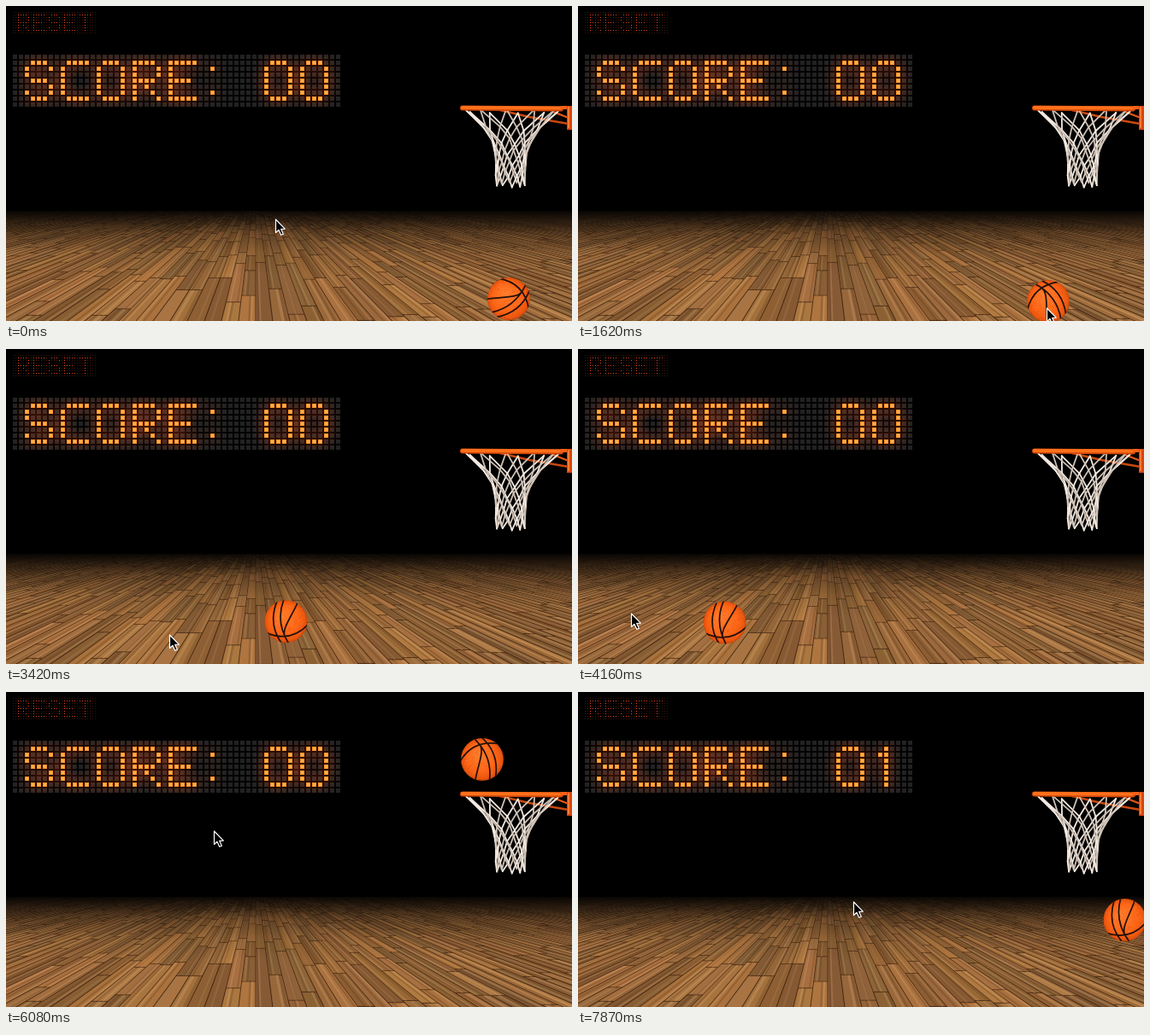
These frames come from a looping animation (662 px wide and 369 px high, 8 s). An HTML page with a canvas:

```html
<!DOCTYPE html>
<html lang="en">
<head>
<meta charset="utf-8">
<title>Basketball</title>
<style>
html, body { margin: 0; width: 100%; height: 100%; overflow: hidden; background: #000; }
canvas { display: block; }
</style>
</head>
<body>
<canvas id="stage" width="662" height="369"></canvas>
<script>
const W = 662, H = 369, LOOP = 8000, TAU = Math.PI * 2;
const R = 25, GRAVITY = 417, FLOOR = 346, CEILING = 25, LEFT = 30;
const ctx = document.getElementById('stage').getContext('2d');

const GLYPHS = {
  S: '.###. #...# #.... .###. ....# #...# .###.',
  C: '.#### #.... #.... #.... #.... #.... .####',
  O: '.###. #...# #...# #...# #...# #...# .###.',
  R: '####. #...# #...# ####. #.#.. #..#. #...#',
  E: '##### #.... #.... ####. #.... #.... #####',
  T: '##### ..#.. ..#.. ..#.. ..#.. ..#.. ..#..',
  ':': '..... .#... ..... ..... ..... .#... .....',
  1: '..#.. .##.. ..#.. ..#.. ..#.. ..#.. ..#..'
};
GLYPHS[0] = GLYPHS.O;

// Seconds and place of the pointer's tip
const pointerPath = [
  [0, 315, 250], [1.62, 548, 354], [1.92, 550, 79], [2.67, 576, 220], [3.27, 217, 340],
  [4.16, 62, 310], [4.9, 105, 331], [5.64, 106, 354], [5.79, 64, 340], [5.88, 243, 163],
  [6.08, 243, 163], [6.83, 280, 311], [7.87, 322, 246], [8, 322, 246]
];
const grabs = [[1.62, 1.92], [5.64, 5.88]];
// Throws and hits on the hoop: the ball flies freely from each
const launches = [
  { at: 0, x: 588, y: 343, vx: 103, vy: 0 },
  { at: .38, x: 627, y: FLOOR, vx: -62, vy: 0 },
  { at: 1.92, x: 552, y: 71, vx: 255, vy: -147 },
  { at: 2.285, x: 627, y: 46, vx: -264, vy: 4 },
  { at: 5.88, x: 245, y: 155, vx: 1560, vy: -422 },
  { at: 6.125, x: 627, y: 64, vx: -100, vy: -320 },
  { at: 6.543, x: 585, y: 95, vx: 41, vy: -147 }
];

function seeded(seed) {
  return () => (seed = (seed * 16807) % 2147483647) / 2147483647;
}

function pointerAt(t) {
  const i = Math.max(1, pointerPath.findIndex(p => p[0] > t));
  const [t0, x0, y0] = pointerPath[i - 1], [t1, x1, y1] = pointerPath[i];
  const u = (t - t0) / (t1 - t0);
  return { x: x0 + (x1 - x0) * u, y: y0 + (y1 - y0) * u };
}

function move(ball, dt) {
  ball.x += ball.vx * dt;
  ball.y += ball.vy * dt + GRAVITY * dt * dt / 2;
  ball.vy += GRAVITY * dt;
  if (ball.y > FLOOR) {
    const rebound = ball.vy > 30 ? ball.vy * .36 : 0;
    if (rebound) ball.vx -= Math.sign(ball.vx) * (ball.vy + rebound) * .085;
    ball.y = FLOOR;
    ball.vy = -rebound;
  }
  if (ball.y < CEILING) {
    ball.y = CEILING;
    ball.vy *= -.6;
  }
  if (ball.x < LEFT) {
    ball.x = LEFT;
    ball.vx *= -.6;
  }
}

// The whole flight, one place per millisecond
function simulate() {
  const path = [], ball = {};
  let next = 0;
  for (let ms = 0; ms < LOOP; ms++) {
    const t = ms / 1000;
    if (next < launches.length && launches[next].at <= t) Object.assign(ball, launches[next++]);
    if (grabs.some(([from, to]) => t >= from && t < to)) {
      const hand = pointerAt(t);
      ball.x = hand.x + 2;
      ball.y = hand.y - 8;
    }
    path.push({ x: ball.x, y: ball.y });
    move(ball, .001);
  }
  return path;
}

// The picture steps every 150 ms, a few steps being shorter.
const shortSteps = { 4: 30, 25: 10, 29: 10, 35: 10, 40: 10, 50: 10 };
const steps = [];
for (let i = 0, t = 0; t < LOOP; i++) {
  steps.push(t);
  t += 150 - (shortSteps[i] || 0);
}

function shade(g, gradient, stops, x = 0, y = 0, w = W, h = H) {
  stops.forEach(([at, color]) => gradient.addColorStop(at, color));
  g.fillStyle = gradient;
  g.fillRect(x, y, w, h);
}

function line(g, points, color, width) {
  g.strokeStyle = color;
  g.lineWidth = width;
  g.beginPath();
  points.forEach(([x, y]) => g.lineTo(x, y));
  g.stroke();
}

function drawFloor(g) {
  const vx = 292, vy = 207, top = 240, depth = H - vy, board = 20;
  const rnd = seeded(71);
  g.save();
  g.beginPath();
  g.rect(0, top, W, H - top);
  g.clip();
  const at = (i, z) => [vx + i * board / z, vy + depth / z];
  for (let i = -95; i < 98; i++) {
    for (let z = .5 + rnd() * .45; z < 5.2;) {
      const far = z + .25 + rnd() * .5;
      g.fillStyle = `hsl(${27 + rnd() * 4}, ${42 + rnd() * 6}%, ${35 + rnd() * 13}%)`;
      g.beginPath();
      [at(i, z), at(i + 1, z), at(i + 1, far), at(i, far)].forEach(([x, y]) => g.lineTo(x, y));
      g.closePath();
      g.fill();
      g.strokeStyle = 'rgba(55,28,10,.55)';
      g.lineWidth = Math.min(1.1, .8 / z);
      g.stroke();
      for (const color of ['rgba(60,30,10,.2)', 'rgba(240,195,140,.2)']) {
        const grain = i + .15 + rnd() * .7;
        line(g, [at(grain, z), at(grain, far)], color, 2 / z);
      }
      z = far;
    }
  }
  shade(g, g.createLinearGradient(0, top, 0, 315),
    [[0, 'rgba(0,0,0,.92)'], [.15, 'rgba(0,0,0,.66)'], [.35, 'rgba(0,0,0,.34)'],
      [.65, 'rgba(0,0,0,.1)'], [1, 'rgba(0,0,0,0)']]);
  g.restore();
}

// Parts are pairs of text and first column.
function drawBoard(g, x, y, cols, pitch, size, off, on, glow, parts) {
  const cell = (c, r) => g.fillRect(x + c * pitch, y + r * pitch, size, size);
  g.fillStyle = off;
  for (let r = 0; r < 9; r++) for (let c = 0; c < cols; c++) cell(c, r);
  const lit = [];
  parts.forEach(([text, start]) => [...text].forEach((ch, n) =>
    GLYPHS[ch].split(' ').forEach((row, r) => [...row].forEach((dot, c) => {
      if (dot === '#') lit.push([start + n * 6 + c, r + 1]);
    }))));
  if (glow) {
    g.save();
    g.beginPath();
    g.rect(x, y, cols * pitch, 9 * pitch - 2);
    g.clip();
    g.globalCompositeOperation = 'lighter';
    lit.forEach(([c, r]) => {
      const cx = x + c * pitch + size / 2, cy = y + r * pitch + size / 2;
      shade(g, g.createRadialGradient(cx, cy, 0, cx, cy, 17),
        [[0, 'rgba(255,75,20,.06)'], [.8, 'rgba(255,75,20,.025)'], [1, 'rgba(255,75,20,0)']],
        cx - 17, cy - 17, 34, 34);
    });
    g.restore();
  }
  g.fillStyle = on;
  lit.forEach(([c, r]) => cell(c, r));
  if (glow) {
    g.fillStyle = '#ffb04c';
    lit.forEach(([c, r]) => g.fillRect(x + c * pitch + 1, y + r * pitch + 1, size - 2, size - 2));
  }
}

function drawHoop(g) {
  const n = 10, rows = 6, rnd = seeded(33);
  const knots = [];
  for (let r = 0; r <= rows; r++) {
    const v = (r / rows) ** .8;
    const half = 16.5 + 38 * (1 - v) ** 3, slack = r ? 2.5 : 0;
    knots.push(Array.from({ length: n }, (_, k) => {
      const a = (k + r / 2 + .3) * TAU / n;
      return [592 - 2 * v + half * Math.cos(a) + (rnd() - .5) * slack,
        123 + 86 * v + 2.5 * Math.sin(a) + (rnd() - .5) * slack];
    }));
  }
  g.lineCap = g.lineJoin = 'round';
  line(g, [[578, 122], [612, 130], [658, 138]], '#c9480f', 2.5);
  line(g, [[640, 124], [658, 131]], '#e85a14', 2);
  for (let r = 0; r < rows; r++) {
    for (let k = 0; k < n; k++) {
      const a = knots[r][k];
      const color = Math.sin((k + r / 2) * TAU / n) < 0 ? '#cdc0b5' : '#f3e9e0';
      line(g, [a, knots[r + 1][k]], color, 1.8);
      line(g, [a, knots[r + 1][(k + n - 1) % n]], color, 1.8);
    }
  }
  line(g, [[534, 119.5], [649, 120.5]], '#d0480a', 6);
  line(g, [[534, 119], [649, 119.5]], '#ff701a', 4);
  line(g, [[650, 119], [662, 119]], '#f36118', 4);
  g.fillStyle = '#dc4310';
  g.fillRect(656, 117, 6, 28);
  g.fillStyle = '#ff7a30';
  g.fillRect(657, 118, 2, 25);
}

function makeScene(score) {
  const layer = document.createElement('canvas');
  layer.width = W;
  layer.height = H;
  const g = layer.getContext('2d');
  g.fillStyle = '#000';
  g.fillRect(0, 0, W, H);
  drawFloor(g);
  drawBoard(g, 8, 7, 33, 3, 1, '#35140a', '#f0441a', false, [['RESET', 2]]);
  drawBoard(g, 8, 57, 55, 7, 5, '#222', '#ff9329', true,
    [['SCORE', 2], [':', 32], [score, 42]]);
  return layer;
}

function drawBall({ x, y }) {
  ctx.save();
  ctx.translate(x, y);
  ctx.beginPath();
  ctx.arc(0, 0, R, 0, TAU);
  ctx.clip();
  shade(ctx, ctx.createRadialGradient(-5, -7, 2, 0, 0, R),
    [[0, '#ff7b2a'], [.65, '#fd6516'], [.92, '#ea560e'], [1, '#c4430a']], -R, -R, 2 * R, 2 * R);
  const rnd = seeded(9);
  ctx.rotate((x - 176) / R);
  for (let i = 0; i < 170; i++) {
    ctx.fillStyle = i % 2 ? 'rgba(255,160,90,.3)' : 'rgba(150,40,0,.22)';
    ctx.fillRect(rnd() * 50 - R, rnd() * 50 - R, 1, 1);
  }
  ctx.strokeStyle = '#21100a';
  ctx.lineWidth = 1.7;
  ctx.beginPath();
  ctx.moveTo(-5, -R);
  ctx.quadraticCurveTo(-21, -2, -11, 23);
  ctx.moveTo(3, -R);
  ctx.quadraticCurveTo(-12, -2, -3, R);
  ctx.moveTo(18, -18);
  ctx.bezierCurveTo(8, -4, -8, 8, -5, 18);
  ctx.moveTo(-R, 8);
  ctx.quadraticCurveTo(0, 26, R, 9);
  ctx.stroke();
  ctx.restore();
}

function drawPointer({ x, y }) {
  ctx.save();
  ctx.translate(Math.round(x), Math.round(y));
  ctx.beginPath();
  [[.5, 0], [.5, 15.5], [4, 12.3], [6.7, 18.3], [9.3, 17.2], [6.7, 11.3], [11.3, 11.1]]
    .forEach(([px, py]) => ctx.lineTo(px, py));
  ctx.closePath();
  ctx.fillStyle = '#000';
  ctx.fill();
  ctx.strokeStyle = '#fff';
  ctx.lineWidth = 1.2;
  ctx.stroke();
  ctx.restore();
}

const scenes = [makeScene('00'), makeScene('01')];
const ballPath = simulate();

function frame(now) {
  const clock = now % LOOP;
  const ms = steps.filter(s => s <= clock + .5).pop();
  ctx.drawImage(scenes[ms < 7400 ? 0 : 1], 0, 0);
  drawBall(ballPath[ms]);
  drawHoop(ctx);
  drawPointer(pointerAt(ms / 1000));
  requestAnimationFrame(frame);
}
requestAnimationFrame(frame);
</script>
</body>
</html>
```
